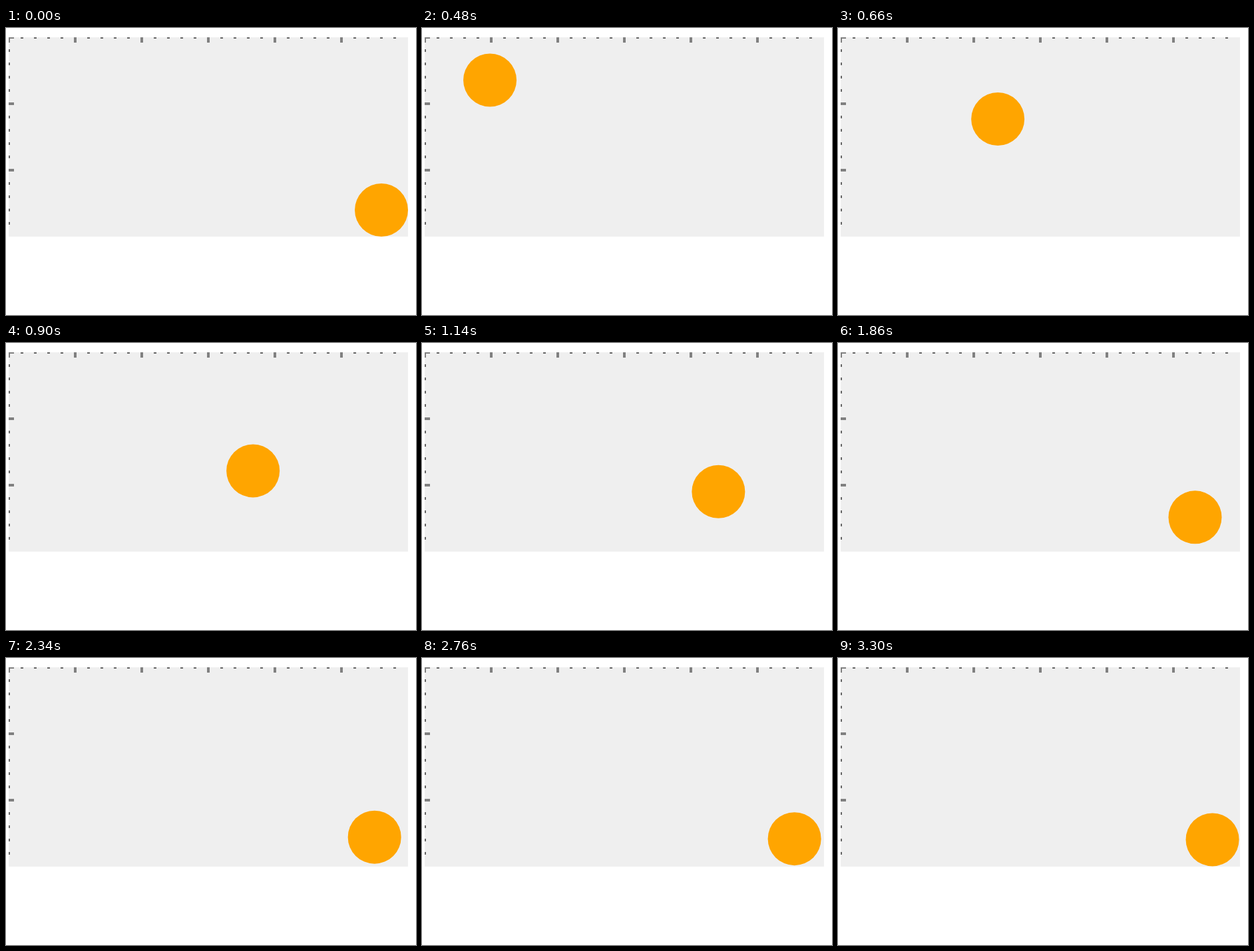
An HTML page with a canvas that plays this animation: 616x432 px, repeating every 3.36 s.

```html
<!DOCTYPE html>
<html>
<head>
<meta charset="utf-8">
<style>
html, body { margin: 0; width: 100%; height: 100%; overflow: hidden; background: #fff; }
canvas { display: block; }
</style>
</head>
<body>
<canvas id="stage" width="616" height="432"></canvas>
<script>
const ctx = document.getElementById('stage').getContext('2d');
const LOOP = 3360, STEP = 60, START = 420;
const LEFT = 4, TOP = 14, WIDTH = 600, HEIGHT = 300, RADIUS = 40;

// Easing steps done after a given time: [ms, steps], about one per 20 ms
const pace = [[0, 0], [240, 11.6], [480, 24.3], [960, 48.1], [1440, 72], [3000, 150]];

function stepsAt(ms) {
  const i = pace.findIndex(p => p[0] > ms);
  const [t0, n0] = pace[i - 1], [t1, n1] = pace[i];
  return n0 + (n1 - n0) * (ms - t0) / (t1 - t0);
}

function tick(x, y, w, h, color) {
  ctx.fillStyle = color;
  ctx.fillRect(LEFT + x, TOP + y, w, h);
}

function drawRulers() {
  for (let p = 0; p < WIDTH; p += 20) {
    const major = p % 100 === 0;
    const length = major ? 8 : 2;
    const color = major ? '#808080' : '#666';
    const from = Math.max(0, p - 2), size = p ? 4 : 2;
    tick(from, 0, size, length, color);
    if (p < HEIGHT) tick(0, from, length, size, color);
  }
}

function draw(time) {
  const t = Math.floor(time % LOOP / STEP) * STEP;
  // Each step closes 4% of the remaining distance to the far corner
  const left = t < START ? 0 : Math.pow(0.96, stepsAt(t - START));

  ctx.fillStyle = '#fff';
  ctx.fillRect(0, 0, 616, 432);
  ctx.fillStyle = '#efefef';
  ctx.fillRect(LEFT, TOP, WIDTH, HEIGHT);
  drawRulers();

  ctx.fillStyle = '#ffa500';
  ctx.beginPath();
  ctx.arc(564 - 520 * left, 274 - 240 * left + 20 * left, RADIUS, 0, 2 * Math.PI);
  ctx.fill();
}

const begin = performance.now();
function frame() {
  draw(performance.now() - begin);
  requestAnimationFrame(frame);
}
frame();
</script>
</body>
</html>
```
